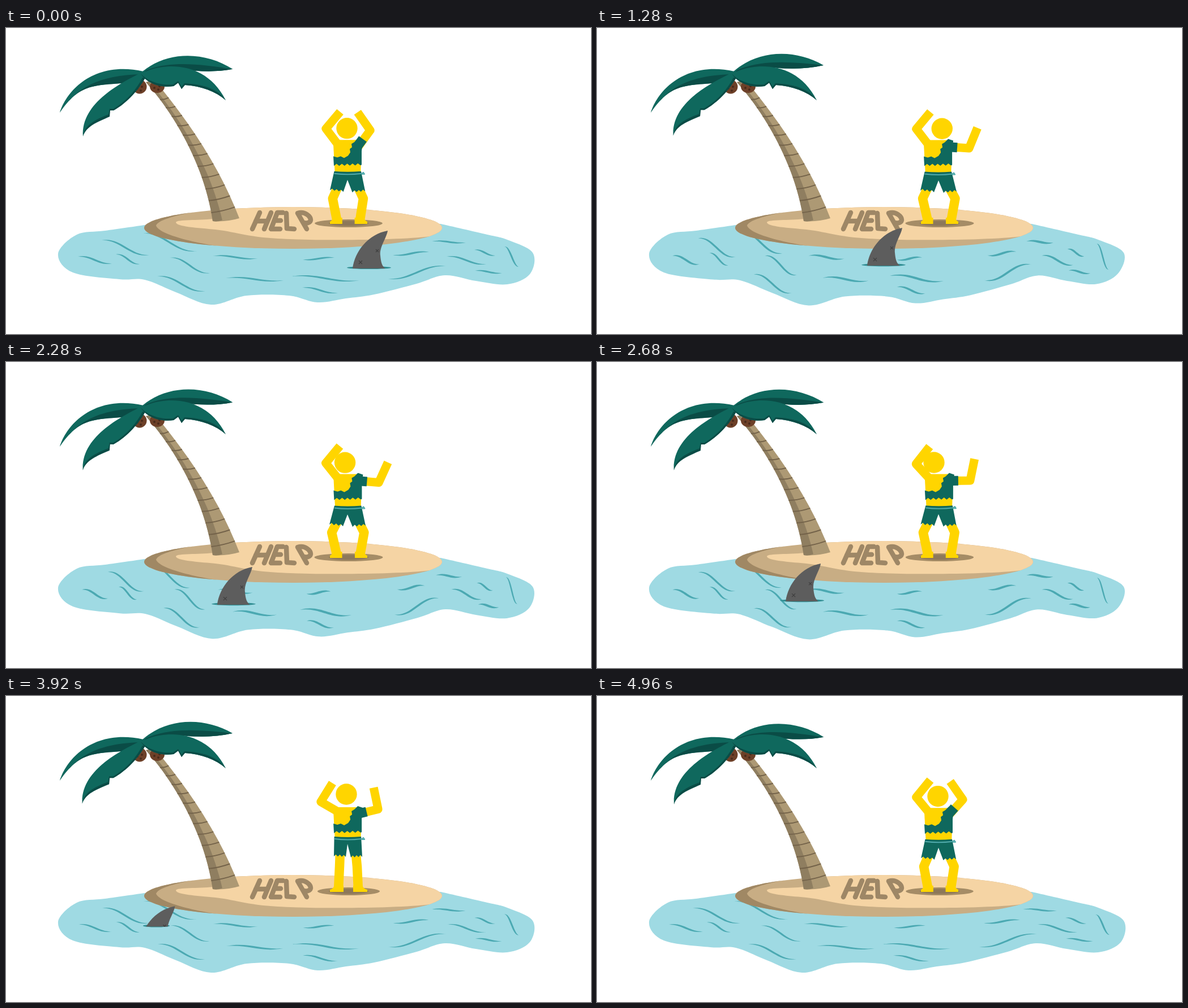
Write an HTML page that moves like this. It is 1033 px wide and 542 px high and loops after 5000 ms.

```html
<!DOCTYPE html>
<html lang="en">
<head>
<meta charset="utf-8">
<title>Castaway</title>
<style>
  html, body { margin: 0; width: 100%; height: 100%; overflow: hidden; background: #fff; }
  svg { display: block; width: 100%; height: 100%; }
  .line { fill: #4ba9b2; transform-box: fill-box; transform-origin: center; }
  .green { fill: #0f685d; }
  .deep { fill: #0a4c46; }
  .limb { fill: none; stroke: #ffd500; stroke-linejoin: round; }
  .sleeve { fill: none; stroke: #0f685d; stroke-width: 17; }
  .rings { fill: none; stroke: #74634a; stroke-width: 2; }
  .help { fill: none; stroke: #9e8766; stroke-width: 8.5; stroke-linecap: round; stroke-linejoin: round; }
</style>
</head>
<body>
<svg viewBox="0 0 1033 542" preserveAspectRatio="none" role="img" aria-label="Castaway on an island with HELP written in the sand">
  <defs>
    <clipPath id="isle"><ellipse cx="507" cy="354" rx="263" ry="37"/></clipPath>
    <clipPath id="above"><rect x="-20" y="-100" width="120" height="100"/></clipPath>
  </defs>

  <path id="water" fill="#9fdae3"/>
  <g id="lines"></g>

  <g clip-path="url(#isle)">
    <rect x="240" y="310" width="540" height="90" fill="#c8ad84"/>
    <path fill="#a08864" d="M240 310 L372 318 C330 326 270 336 265 350 C270 366 340 384 412 391 L240 395Z"/>
    <path fill="#f5d4a4" d="M366 320 L510 300 H780 V364 L750 369 C690 376 560 377 480 373 C425 370 400 360 370 357 C340 354 300 352 300 344 C302 339 340 341 366 338Z"/>
  </g>

  <g class="help">
    <path d="M448 327 L435 356 M468 327 L456 356 M441 342 H461"/>
    <path d="M489 327 H479 L468 356 H484 M474 341 H485"/>
    <path d="M495 328 L496 355 L509 356"/>
    <path d="M515 328 L531 356 M515 328 C528 324 538 334 538 340 C537 346 530 346 525 345"/>
  </g>

  <path id="trunk" fill="#ad9974"/>
  <path id="trunkShade" fill="#8f7e60"/>
  <path id="rings" class="rings"/>

  <g fill="#6d4028">
    <circle cx="236" cy="104" r="12.5"/>
    <ellipse cx="267" cy="104" rx="13" ry="11"/>
  </g>
  <path fill="none" stroke="#492a1b" stroke-width="4" stroke-linecap="round" d="M232 107h0M238 111h0M240 104h0M262 106h0M269 109h0M271 103h0"/>

  <path class="green" d="M95 150 C108 108 158 58 243 77 L222 92 C200 99 160 99 140 108 C120 116 105 135 95 150Z"/>
  <path class="deep" d="M95 150 C125 104 165 84 238 82 L215 97 C190 100 160 99 140 108 C120 116 105 135 95 150Z"/>
  <g id="backFrond">
    <path class="green" d="M241 77 C285 38 350 37 400 66 C370 73 340 73 310 70 C280 68 260 72 243 80Z"/>
    <path class="deep" d="M247 75 C290 55 345 60 400 66 C370 73 340 73 310 70 C280 68 260 72 243 80Z"/>
  </g>
  <g id="frontFrond">
    <path class="green" d="M243 77 C205 96 132 132 136 192 C140 172 160 167 183 156 L183 145 L190 146 C215 132 235 108 246 88Z"/>
    <path class="deep" d="M136 192 C138 172 158 162 181 153 L183 143 L190 143 C215 128 232 106 241 88 L246 88 C235 108 215 132 190 146 L184 146 L183 157 C160 167 142 174 136 192Z"/>
  </g>
  <path class="green" d="M238 81 C275 61 352 56 388 128 C370 112 345 103 316 101 L310 108 L304 97 L296 103 C275 106 250 100 238 81Z"/>
  <path class="deep" d="M388 128 C374 107 345 99 315 98 L310 104 L304 94 L295 100 C275 102 252 96 238 81 C250 100 275 106 296 103 L304 97 L310 108 L316 101 C345 103 370 112 388 128Z"/>

  <ellipse id="shade" cx="605" cy="346" ry="7" fill="#a58c66"/>
  <ellipse cx="605" cy="346" rx="35" ry="4.5" fill="#8d785a"/>

  <g id="man">
    <path id="legs" class="limb" stroke-width="16.5"/>
    <path id="feet" fill="#ffd500"/>
    <path id="armL" class="limb" stroke-width="15"/>
    <path id="armR" class="limb" stroke-width="15"/>
    <path id="torso" fill="#ffd500" d="M583 198 H624 L628 206 L626 262 H581 L578 206Z"/>
    <path id="sleeve" class="sleeve"/>
    <path id="shirt" class="green"/>
    <path id="shorts" class="green"/>
    <path id="belt" fill="none" stroke="#4fa9ab" stroke-width="2" stroke-linejoin="round"/>
    <circle id="head" r="18.7" fill="#ffd500"/>
  </g>

  <g id="shark">
    <ellipse id="ripple" cx="29" cy="-1.5" ry="2.6" fill="#2f8d92"/>
    <g clip-path="url(#above)">
      <g id="fin">
        <path fill="#5d5d5d" d="M0 0 C4 -31 28 -61 62 -67 C60 -54 47 -38 49 -23 C50 -11 52 -4 58 0Z"/>
        <path fill="none" stroke="#3f3f3f" stroke-width="1.3" d="M11 -14 l6 6 m0 -6 l-6 6 M41 -34 l5 5 m0 -5 l-5 5"/>
      </g>
    </g>
  </g>
</svg>

<script>
const LOOP = 5000, STEP = 40, { PI, sin, cos, sign, exp, max, min } = Math;
const set = (id, o) => {
  const el = document.getElementById(id);
  for (const k in o) el.setAttribute(k, o[k]);
};
const mix = (a, b, k) => a + (b - a) * k;
const mixPt = (a, b, k) => a.map((v, i) => mix(v, b[i], k));
const rad = d => d * PI / 180;
const wave = p => (1 - cos(PI * p)) / 2;

// Water: a smooth closed curve through a few shore points
const shore = [[245, 349], [175, 359], [125, 366], [92, 400], [118, 433], [200, 445],
  [245, 446], [300, 468], [362, 490], [425, 474], [500, 474], [550, 486], [600, 479],
  [650, 472], [725, 453], [775, 438], [830, 448], [885, 454], [925, 436], [930, 398],
  [885, 375], [850, 366], [768, 347]];

function waterPath(swell) {
  const pts = shore.map(([x, y]) => {
    const k = y > 430 ? swell * sin(PI * (x - 118) / 712) : 0;
    return [x + 16 * k, y + 2 * k];
  });
  const n = pts.length, p = i => pts[min(n - 1, max(0, i))];
  let d = 'M' + pts[0];
  for (let i = 0; i < n - 1; i++) {
    const [a, b, c, e] = [p(i - 1), p(i), p(i + 1), p(i + 2)];
    d += `C${b.map((v, j) => v + (c[j] - a[j]) / 6)} ${c.map((v, j) => v - (e[j] - b[j]) / 6)} ${c}`;
  }
  return d + 'Z';
}

// Each ripple: start, width and height of one tapered S-curve
const ripples = [[169, 376, 84, 26], [194, 401, 42, 17], [127, 405, 60, 12],
  [289, 407, 71, 27], [267, 440, 85, 26], [240, 364, 97, 31], [365, 404, 80, 4],
  [388, 443, 102, 4], [505, 440, 119, 7], [523, 460, 63, 9], [524, 410, 56, -3],
  [673, 444, 105, -22], [683, 402, 64, -5], [752, 378, 60, 2], [778, 405, 70, 13],
  [827, 393, 37, 10], [828, 430, 48, 4], [880, 387, 26, 36]];

function taper([x, y, w, h]) {
  const over = .05 * w * sign(h), len = Math.hypot(w, h), nx = -h / len * 2.1, ny = w / len * 2.1;
  const ctrl = (k, v, side) => [x + w * k + nx * side, v + ny * side];
  const up = y - over, down = y + h + over;
  return `M${x} ${y}C${ctrl(.4, up, -1)} ${ctrl(.6, down, -1)} ${x + w} ${y + h}` +
         `C${ctrl(.6, down, 1)} ${ctrl(.4, up, 1)} ${x} ${y}Z`;
}
const group = document.getElementById('lines');
group.innerHTML = ripples.map(r => `<path class="line" d="${taper(r)}"/>`).join('');
const lines = [...group.children];

// Trunk: two edges, with shading and rings placed between them
const left = [[247, 96], [295, 150], [350, 240], [365, 342]];
const right = [[262, 92], [318, 160], [375, 240], [412, 337]];
const on = ([a, b, c, d], k) => {
  const ab = mixPt(a, b, k), bc = mixPt(b, c, k), cd = mixPt(c, d, k);
  return mixPt(mixPt(ab, bc, k), mixPt(bc, cd, k), k);
};
const band = ([a, b, c, d], [e, f, g, h]) =>
  `M${a}C${b} ${c} ${d}Q${(d[0] + h[0]) / 2} 344 ${h}C${g} ${f} ${e}Z`;
set('trunk', { d: band(left, right) });
set('trunkShade', { d: band(left, left.map((p, i) => mixPt(p, right[i], .36))) });
let rings = '';
for (let i = 0; i < 12; i++) {
  const k = .17 + .071 * i, a = on(left, k), b = on(right, k - .02), m = mixPt(a, b, .5);
  rings += `M${a}Q${m[0]} ${m[1] + 2.5} ${b}`;
}
set('rings', { d: rings });

// Torn hem from one point to another
function hem(x0, y0, x1, y1, n, h) {
  let d = '';
  for (let i = 0; i <= n; i++)
    d += `L${mix(x0, x1, i / n)} ${mix(y0, y1, i / n) + (i % 2 ? -h : h * .4)}`;
  return d;
}
set('shirt', { d: 'M621 196L630 199L628 218V242' + hem(626, 242, 579, 243, 10, 2.6) +
  'L578 227L585 229L591 227L597 230L604 226L608 220L607 214L611 211L610 205L615 202Z' });

function arm(id, x, y, upper, fore, len) {
  const ex = x + len * cos(rad(upper)), ey = y + len * sin(rad(upper));
  set(id, { d: `M${x} ${y}L${ex} ${ey}l${39 * sin(rad(fore))} ${-39 * cos(rad(fore))}` });
}

function drawMan(p, sway) {
  // The man crouches, rising once late in the loop
  const gap = (p - .784 + 1.5) % 1 - .5;
  const s = 1 - exp(-((gap / .15) ** 2));
  const l = wave(22 * p + .45 * sin(2 * PI * p)), r = wave(22 * p - sin(PI * p));
  const dx = -sway, top = 197 + 1.5 * s, waist = 249 + 5.5 * s;

  set('head', { cx: 602 + 8 * sway, cy: 174 + 4.2 * s });
  set('shade', { rx: 55 + 5.5 * s });
  for (const id of ['torso', 'shirt'])
    set(id, { transform: `translate(${dx} ${top - 198})` });

  arm('armL', 586 + dx, top + 8, mix(-127, -152, l), mix(40, 31, l), 35);
  const up = mix(-54, 5, r), c = cos(rad(up)), n = sin(rad(up)), sx = 620 + dx, sy = top + 12;
  arm('armR', sx + 2, sy, up, -35 + 60 * r ** 2.5, 36);
  set('sleeve', { d: `M${sx - 4 * c} ${sy - 4 * n}L${sx + 17 * c} ${sy + 17 * n}` });

  const kl = 589 - 14 * s, kr = 620 + 12.5 * s, al = 587 - 2.5 * s, ar = 622 + 3 * s;
  set('legs', { d: `M${590 + dx} 272L${kl} 302L${al} 343M${617 + dx} 272L${kr} 302L${ar} 343` });
  set('feet', { d: `M${al - 8} 337Q${al - 9} 341 572 343V347H${al + 9}V336Z` +
                   `M${ar + 8} 337Q${ar + 9} 341 638 343V347H${ar - 9}V336Z` });

  const wl = 579.5 + dx, wr = 627 + dx, by = waist + 5;
  set('shorts', { d: `M${wl} ${waist}Q603 ${waist + 2} ${wr} ${waist}` +
    hem(629 + 6 * s, 284 + 5 * s, 609 + 3 * s, 285 + 6 * s, 6, 2.4) +
    `L603 ${262 + 8 * s}` +
    hem(600 - 5 * s, 284 + 6 * s, 579 - 8 * s, 283 + 4 * s, 6, 2.4) + 'Z' });
  set('belt', { d: `M${wl} ${by - 1}Q603 ${by + 2} ${wr + 1} ${by - 1}l3 -2 l2 3 l-5 0` });
}

// The fin cruises left, turns away around the island and sinks
function drawShark(t) {
  const turn = (t / 3920) ** 6, sink = max(0, (t - 3350) * .054);
  const x = 612 - .1055 * t + 38 * turn;
  const y = 426 + 5 * sin(2 * PI * t / 1800) - 22 * turn;
  set('shark', { transform: `translate(${x} ${y})`, visibility: sink < 67 ? 'visible' : 'hidden' });
  set('fin', { transform: `translate(0 ${sink})` });
  set('ripple', { rx: max(0, 39 - sink * .5) });
}

function draw(t) {
  // Sea and head move for four seconds, then rest
  const calm = min(t, 4000) / 4000, sway = sin(2 * PI * calm), bend = sin(PI * calm);
  const droop = max(0, cos(2 * PI * t / 2500)) ** 1.5;
  set('water', { d: waterPath(sway * sway) });
  for (const el of lines) el.style.transform = `scale(${1 - .24 * bend}, ${1 + .3 * bend})`;
  set('backFrond', { transform: `rotate(${2.5 * droop} 243 77)` });
  set('frontFrond', { transform: `rotate(${.7 * (1 - droop)} 243 80)` });
  drawMan(t / LOOP, sway);
  drawShark(t);
}

const start = performance.now();
function frame() {
  const t = (performance.now() - start) % LOOP;
  draw(Math.floor(t / STEP) * STEP);
  requestAnimationFrame(frame);
}
draw(0);
requestAnimationFrame(frame);
</script>
</body>
</html>
```
